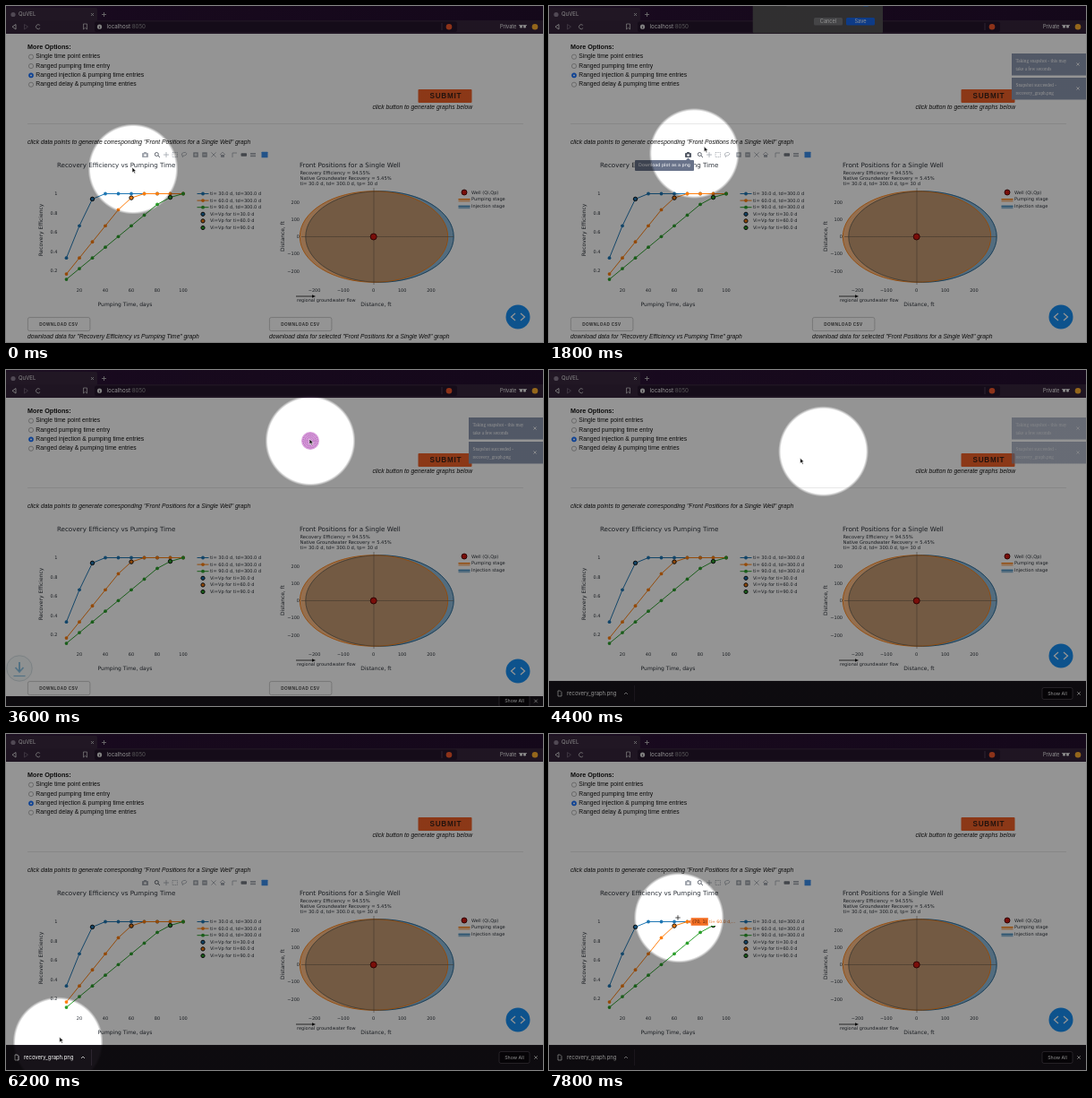
Write an HTML page with a canvas that moves like this. It is 600x375 px and loops after 8 s.

```html
<!DOCTYPE html>
<html lang="en">
<head>
<meta charset="utf-8">
<title>Recovery graphs</title>
<style>
html, body { margin: 0; width: 100%; height: 100%; overflow: hidden; background: #949494; }
canvas { display: block; width: 100vw; height: 100vh; }
</style>
</head>
<body>
<canvas id="stage"></canvas>
<script>
const W = 600, H = 375, LOOP = 8000, STEP = 200;
const SANS = '"Liberation Sans", Arial, sans-serif';
const PLOT = '"DejaVu Sans", Verdana, sans-serif';
const UI = 'Inter, Roboto, sans-serif';
const SERIF = '"Liberation Serif", serif';
const BLUE = '#1f77b4', ORANGE = '#ff7f0e', GREEN = '#2ca02c', INK = '#2a3038';
const SOFT_BLUE = 'rgba(31,119,180,.5)', SOFT_ORANGE = 'rgba(255,127,14,.5)';

const canvas = document.getElementById('stage');
const c = canvas.getContext('2d');

function resize() {
  const r = window.devicePixelRatio || 1;
  canvas.width = Math.round(innerWidth * r);
  canvas.height = Math.round(innerHeight * r);
}
addEventListener('resize', resize);
resize();

// Drawing helpers
function text(s, x, y, size, { font = SANS, color = '#111', align = 'left', style = '', gap = 0 } = {}) {
  c.font = `${style} ${size}px ${font}`;
  c.fillStyle = color;
  c.textAlign = align;
  c.textBaseline = 'middle';
  c.letterSpacing = gap + 'px';
  c.fillText(s, x, y);
}
function box(x, y, w, h, fill, radius = 0, stroke, lw = 0.6) {
  c.beginPath();
  c.roundRect(x, y, w, h, radius);
  paint(fill, stroke, lw);
}
function disc(x, y, r, fill, stroke, lw = 0.7) {
  c.beginPath();
  c.arc(x, y, r, 0, 7);
  paint(fill, stroke, lw);
}
function paint(fill, stroke, lw) {
  if (fill) { c.fillStyle = fill; c.fill(); }
  if (stroke) { c.strokeStyle = stroke; c.lineWidth = lw; c.stroke(); }
}
function line(pts, color, lw = 0.8, fill) {
  c.beginPath();
  for (let i = 0; i < pts.length; i += 2) c.lineTo(pts[i], pts[i + 1]);
  paint(fill, color, lw);
}
function cross(x, y, r, color) {
  line([x - r, y - r, x + r, y + r], color);
  line([x - r, y + r, x + r, y - r], color);
}
function faded(alpha, draw) {
  if (alpha <= 0) return;
  c.save();
  c.globalAlpha *= Math.min(1, alpha);
  draw();
  c.restore();
}
const ramp = (t, a, b) => Math.max(0, Math.min(1, (t - a) / (b - a)));

// Pointer path: time, x, y, joined by a monotone cubic that rests at holds
const path = [
  [0, 142, 182], [300, 142, 182], [1000, 155, 168], [1600, 155, 168],
  [2600, 340, 79], [4100, 340, 79], [4920, 84, 202], [5000, 64, 242],
  [5350, 58, 344], [6100, 58, 344], [7100, 156, 206], [7400, 156, 206],
  [7800, 144, 205], [8000, 144, 205]
];
const slope = (i, k) => path[i] && path[i + 1]
  ? (path[i + 1][k] - path[i][k]) / (path[i + 1][0] - path[i][0]) : 0;
function tangent(i, k) {
  const a = slope(i - 1, k), b = slope(i, k);
  return a * b > 0 ? 2 * a * b / (a + b) : 0;
}
function pointer(t) {
  t = Math.max(0, t);
  const j = Math.max(1, path.findIndex(p => p[0] >= t)), i = j - 1;
  const d = path[j][0] - path[i][0], u = (t - path[i][0]) / d, v = 1 - u;
  return [1, 2].map(k =>
    path[i][k] * (1 + 2 * u) * v * v + path[j][k] * u * u * (3 - 2 * u) +
    d * u * v * (tangent(i, k) * v - tangent(j, k) * u));
}

function browser() {
  const g = c.createLinearGradient(0, 0, W, 0);
  g.addColorStop(0, '#351f3e');
  g.addColorStop(0.2, '#291033');
  g.addColorStop(1, '#230d2d');
  box(0, 0, W, 17, g);
  box(0, 2, 102, 15, '#39273e', 2);
  box(0, 16, W, 15, '#35243b');
  box(99, 17.5, 405, 11.5, '#24142b', 2);
  disc(8, 9.5, 2.6, '#8b7d91');
  text('QuVEL', 14, 9.5, 6, { font: UI, color: '#eee' });
  cross(96.5, 9.5, 1.5, '#ccc');
  line([107, 9.5, 112, 9.5], '#ccc');
  line([109.5, 7, 109.5, 12], '#ccc');
  line([11, 20.5, 7, 23.2, 11, 26, 11, 20.5], '#eee');
  line([20.5, 20.5, 24.5, 23.2, 20.5, 26, 20.5, 20.5], '#75677a');
  c.beginPath();
  c.arc(36, 23.2, 2.5, 0.6, 5.6);
  paint(null, '#ddd', 0.8);
  line([86.5, 20, 90.5, 20, 90.5, 26, 88.5, 24.3, 86.5, 26, 86.5, 20], '#ddd', 0.7);
  disc(104.5, 23.2, 2.6, '#ddd');
  line([104.5, 22.6, 104.5, 24.7], '#24142b');
  text('localhost', 112.5, 23.4, 6.2, { font: UI, color: '#fff' });
  const w = c.measureText('localhost').width;
  text(':8050', 112.5 + w, 23.4, 6.2, { font: UI, color: '#999' });
  line([487, 19, 487, 27], '#77667c', 0.5);
  disc(495, 23.2, 3.3, '#f2572b');
  text('Private', 552, 23.4, 5.6, { font: UI, color: '#fff' });
  box(574, 21.5, 3, 3, '#eee', 1);
  box(578, 21.5, 3, 3, '#eee', 1);
  line([573, 21.5, 582, 21.5], '#eee', 0.8);
  disc(591, 23.2, 3.3, '#ffb02e');
}

function form() {
  text('More Options:', 24, 46, 7.2, { style: 'bold' });
  ['Single time point entries', 'Ranged pumping time entry',
   'Ranged injection & pumping time entries', 'Ranged delay & pumping time entries'
  ].forEach((s, i) => {
    const y = 56.5 + i * 10.35, on = i === 2;
    disc(28, y + 0.2, 2.6, on ? '#1a73ff' : '#fff', on ? '#1a73ff' : '#888', 0.6);
    if (on) disc(28, y + 0.2, 1, '#fff');
    text(s, 33.3, y, 6.74);
  });
  box(460.5, 93, 60, 15, '#f06028', 1);
  text('SUBMIT', 473.5, 100.8, 8.2, { gap: 0.7, style: 'bold', color: '#3c2018' });
  const it = { style: 'italic' };
  text('click button to generate graphs below', 521, 113.5, 6.74, { ...it, align: 'right' });
  line([24, 131.5, 578, 131.5], '#d8d8d8', 0.6);
  text('click data points to generate corresponding "Front Positions for a Single Well" graph', 24, 151.8, 6.72, it);
  [24, 294].forEach(x => {
    box(x + 0.4, 347.6, 69.5, 15, '#fff', 2, '#aaa', 0.6);
    text('DOWNLOAD CSV', x + 13.2, 356, 4.6, { style: 'bold', gap: 0.42, color: '#444' });
  });
  text('download data for "Recovery Efficiency vs Pumping Time" graph', 24, 368.7, 6.72, it);
  text('download data for selected "Front Positions for a Single Well" graph', 294, 368.7, 6.72, it);
}

function label(s, x, y, size, align = 'left', color = INK) {
  text(s, x, y, size, { font: PLOT, color, align });
}
function upright(s, x, y, size) {
  c.save();
  c.translate(x, y);
  c.rotate(-Math.PI / 2);
  label(s, 0, 0, size, 'center');
  c.restore();
}

function efficiencyPlot() {
  const px = d => 53 + 1.45 * d, py = v => 317 - 107.5 * v;
  label('Recovery Efficiency vs Pumping Time', 57, 178, 7.1);
  for (let d = 20; d <= 100; d += 20) label(d, px(d), 317.3, 5, 'center');
  for (const v of [0.2, 0.4, 0.6, 0.8, 1]) label(v, 57.5, py(v) + 0.4, 5, 'right');
  label('Pumping Time, days', 133, 333.3, 6, 'center');
  upright('Recovery Efficiency', 39.8, 250, 6);

  const series = [[30, BLUE, 0.945], [60, ORANGE, 0.957], [90, GREEN, 0.962]];
  series.forEach(([ti, color, knee], i) => {
    const value = d => d === ti ? knee : Math.min(1, d / ti);
    const pts = [];
    for (let d = 10; d <= 100; d += 10) pts.push(px(d), py(value(d)));
    line(pts, color, 1);
    for (let k = 0; k < pts.length; k += 2) disc(pts[k], pts[k + 1], 1.9, color);
    const y = 209.5 + i * 7.6;
    line([213.5, y, 226.5, y], color, 1);
    disc(220, y, 1.9, color);
    label(`ti= ${ti}.0 d, td=300.0 d`, 228, y + 0.2, 5.05);
    disc(220, y + 22.8, 2.1, color, '#111', 1);
    label(`Vi=Vp for ti=${ti}.0 d`, 228, y + 23, 5.05);
  });
  series.forEach(([ti, color, knee]) => disc(px(ti), py(knee), 2.2, color, '#111', 1));
}

function positionPlot() {
  label('Front Positions for a Single Well', 328, 178, 7.2);
  ['Recovery Efficiency = 94.55%', 'Native Groundwater Recovery = 5.45%',
   'ti= 30.0 d, td= 300.0 d, tp= 30 d'].forEach((s, i) => label(s, 328.5, 186.4 + i * 6.3, 5.2));
  const minus = n => String(n).replace('-', '−');
  for (let n = -200; n <= 200; n += 100) {
    label(minus(n), 410.5 + n * 0.322 - (n < 0 ? 1.5 : 0), 317.3, 5, 'center');
    label(minus(n), 328, 257.9 - n * 0.192, 5, 'right');
  }
  label('Distance, ft', 413.5, 333.3, 6, 'center');
  upright('Distance, ft', 309.7, 257, 5.9);

  const front = (x, fill, stroke, lw = 0.9) => {
    c.beginPath();
    c.ellipse(x, 257.5, 82.7, 50.8, 0, 0, 7);
    paint(fill, stroke, lw);
  };
  front(417.5, SOFT_BLUE, BLUE);
  front(411, SOFT_ORANGE, ORANGE);
  front(417.5, null, 'rgba(70,80,85,.6)', 0.5);
  line([330, 257.5, 500, 257.5], '#5c5144', 0.5);
  line([411, 203, 411, 311], '#5c5144', 0.5);
  disc(410.7, 257.5, 3.5, '#d01810', '#400', 0.9);

  line([324, 324, 343, 324], '#111', 0.8);
  line([342, 322.3, 346, 324, 342, 325.7], null, 0, '#111');
  label('regional groundwater flow', 325, 328.3, 5);

  disc(512, 208, 3, '#d01810', '#400', 0.9);
  label('Well (Qi,Qp)', 520, 208.3, 5.05);
  [['Pumping stage', ORANGE, SOFT_ORANGE], ['Injection stage', BLUE, SOFT_BLUE]].forEach(([s, color, soft], i) => {
    const y = 215.5 + i * 7.7;
    box(505.5, y, 13, 3, soft);
    line([505.5, y, 518.5, y], color, 1);
    label(s, 520, y + 0.4, 5.05);
  });
}

function modebar(hot) {
  const y = 166, g = '#a0a5ad', cam = hot ? '#555b66' : g;
  box(152, y - 2, 7, 5, cam, 0.8);
  box(154, y - 3, 3, 2, cam);
  disc(155.5, y + 0.5, 1.3, '#fff');
  disc(168.3, y - 0.5, 2, null, '#60656e', 1);
  line([169.8, y + 1, 172, y + 3], '#60656e', 1);
  line([176, y, 182, y], g);
  line([179, y - 3, 179, y + 3], g);
  c.setLineDash([1, 0.7]);
  box(186, y - 2.5, 5.5, 5, null, 0, g, 0.8);
  c.setLineDash([]);
  c.beginPath();
  c.ellipse(199, y - 0.7, 2.8, 1.8, -0.3, 0, 7);
  paint(null, g, 0.8);
  line([197, y + 0.8, 197.5, y + 3], g);
  [212, 222].forEach((x, i) => {
    box(x - 2.8, y - 2.8, 5.6, 5.6, g, 0.5);
    line([x - 1.7, y, x + 1.7, y], '#fff');
    if (!i) line([x, y - 1.7, x, y + 1.7], '#fff');
  });
  cross(232, y, 2.6, g);
  line([239, y, 242, y - 2.8, 245, y], g);
  box(240, y, 4, 2.8, g);
  line([253, y + 3, 253, y - 2, 258, y - 2], g);
  box(262.5, y - 1.8, 6.5, 3.6, '#737881', 0.8);
  box(273, y - 2, 6, 1.6, g);
  box(273, y + 0.6, 6, 1.6, g);
  box(285.5, y - 3.2, 7, 6.5, '#3b8eea', 0.5);
}

function tooltip() {
  line([152.5, 172.5, 155.5, 169.5, 158.5, 172.5], null, 0, '#69738a');
  box(96, 172, 66, 12, '#69738a', 1);
  label('Download plot as a png', 129, 178, 4.9, 'center', '#fff');
}

function notice(y, a, b) {
  box(517, y, 83, 24.5, '#8c97af');
  text(a, 521.5, y + 8.5, 5.3, { font: SERIF, color: '#fff' });
  text(b, 521.5, y + 17.3, 5.3, { font: SERIF, color: '#fff' });
  cross(591, y + 12, 1.6, '#fff');
}

function hoverLabel() {
  box(177, 205, 31, 9, '#fff');
  line([155, 209.5, 159, 207, 159, 212], null, 0, '#f46f24');
  box(158.5, 205, 19.5, 9, '#f46f24', 0, '#fff', 0.4);
  label('(70, 1)', 168.3, 209.7, 4.9, 'center', '#4a2008');
  label('ti= 60.0 d,...', 178.8, 209.7, 4.7, 'left', '#e66a18');
}

function debugButton(y) {
  disc(572, y, 13.5, '#168ef2');
  line([569, y - 4, 564.5, y, 569, y + 4], '#fff', 1.3);
  line([575, y - 4, 579.5, y, 575, y + 4], '#fff', 1.3);
}

function downloadMark(y) {
  disc(15, y, 15.5, '#f3f7f9', '#fff', 1.2);
  disc(15, y, 14.2, null, '#bdcbd1', 0.7);
  line([15, y - 7, 15, y + 3], '#74b5dc', 2);
  line([10.5, y - 1, 15, y + 4, 19.5, y - 1], '#74b5dc', 1.8);
  line([8.5, y + 8.5, 21.5, y + 8.5], '#74b5dc', 1.2);
}

function shelf(h) {
  if (h <= 0) return;
  const top = H - h, y = top + h / 2;
  c.save();
  c.beginPath();
  c.rect(0, top, W, h);
  c.clip();
  box(0, top, W, h, '#171319');
  line([0, top + 0.2, W, top + 0.2], '#332b37', 0.5);
  if (h > 20) {
    line([10, y - 3, 12.5, y - 3, 14, y - 1.5, 14, y + 3, 10, y + 3, 10, y - 3], '#ddd', 0.8);
    text('recovery_graph.png', 20, y + 0.2, 5.9, { font: UI, color: '#fff' });
    line([84, y + 1, 86, y - 1, 88, y + 1], '#ddd');
    line([95.5, top + 5, 95.5, H - 5], '#423846', 0.5);
  }
  box(551, y - 6.5, 34, 13, '#0a070c', 2, '#6e6573', 0.5);
  text('Show All', 568, y + 0.2, 5.3, { font: UI, color: '#fff', align: 'center' });
  cross(592, y, 1.8, '#ddd');
  c.restore();
}

function saveSheet(open) {
  if (open <= 0) return;
  c.save();
  c.translate(0, -94 * (1 - open));
  box(227.7, -6, 145.3, 98.8, '#525153', 1.5);
  const side = { font: UI, color: '#ddd', align: 'right' }, value = { font: UI, color: '#fff' };
  text('Save As:', 257, 12.2, 5.6, side);
  box(260, 7.3, 105, 9.7, '#2c2d30', 1, '#3f78ae', 1.4);
  box(261.5, 8.7, 43, 7, '#3f70a8');
  text('recovery_graph', 262, 12.2, 5.6, value);
  text('Tags:', 257, 23.7, 5.6, side);
  box(260, 19.5, 105, 8.5, '#434244', 0.5, '#626163', 0.4);
  text('Where:', 257, 37.2, 5.6, side);
  box(260, 32.7, 94, 9, '#6a696b', 1.5);
  box(263.5, 35, 6, 4.5, '#45a5e8', 0.5);
  text('Downloads', 272, 37.2, 5.6, value);
  box(356.5, 32.7, 8, 9, '#6a696b', 1.5);
  line([359, 36.5, 360.5, 38.2, 362, 36.5], '#fff');
  line([228, 46.5, 373, 46.5], '#646365', 0.5);
  text('Format:', 263, 58.7, 5.6, side);
  box(265, 54.2, 92, 9, '#6a696b', 1.5);
  text('PNG image', 267.5, 58.7, 5.6, value);
  [[348, 37.2], [351, 58.7]].forEach(([x, y]) => {
    box(x, y - 4.5, 6, 9, '#176fe6', 1.3);
    line([x + 1.7, y - 1, x + 3, y - 2.7, x + 4.3, y - 1], '#fff', 0.7);
    line([x + 1.7, y + 1, x + 3, y + 2.7, x + 4.3, y + 1], '#fff', 0.7);
  });
  box(296, 75.7, 32, 8.5, '#77777a', 1.5);
  text('Cancel', 312, 80, 5.6, { ...value, align: 'center' });
  box(332, 75.7, 32, 8.5, '#1766e8', 1.5);
  text('Save', 348, 80, 5.6, { ...value, align: 'center' });
  c.restore();
}

function spotlight(x, y) {
  const g = c.createRadialGradient(x, y, 47.5, x, y, 50.5);
  g.addColorStop(0, 'rgba(0,0,0,0)');
  g.addColorStop(1, 'rgba(0,0,0,.42)');
  box(0, 0, W, H, g);
}

function clickMark(x, y, r) {
  disc(x, y, r, 'rgba(190,90,195,.6)');
  c.setLineDash([1, 1]);
  for (let k = 2; k < r; k += 2) disc(x, y, k, null, 'rgba(120,30,130,.65)', 0.8);
  c.setLineDash([]);
}

function cursor(x, y, kind) {
  if (kind === 'cross') {
    for (const [color, lw] of [['#fff', 1.6], ['#222', 0.8]]) {
      line([x - 2.7, y, x + 2.7, y], color, lw);
      line([x, y - 2.7, x, y + 2.7], color, lw);
    }
  } else if (kind === 'hand') {
    box(x - 1, y + 1, 1.7, 5, '#111', 0.8, '#fff', 0.5);
    box(x - 2, y + 3.8, 5, 4, '#111', 1.2, '#fff', 0.5);
  } else {
    line([x - 1, y - 2, x - 1, y + 4, x + 0.5, y + 2.8, x + 1.6, y + 5, x + 2.6, y + 4.5,
          x + 1.6, y + 2.3, x + 3.4, y + 2.2, x - 1, y - 2], '#fff', 0.6, '#111');
  }
}

function scene(t) {
  const [x, y] = pointer(t), [sx, sy] = pointer(t - 80);
  const shelfH = 28 * ramp(t, 3470, 3800);
  const onCamera = t >= 1000 && t < 3500;
  const inPlot = x > 60 && x < 206 && y > 202 && y < 300;

  box(0, 0, W, H, '#fff');
  form();
  efficiencyPlot();
  positionPlot();
  faded(t < 3500 ? 1 : ramp(t, 4930, 5250), () => modebar(onCamera));
  if (onCamera) tooltip();
  if (t >= 7000) hoverLabel();
  const gone = 1 - ramp(t, 4200, 4800);
  faded(ramp(t, 1100, 1400) * gone, () => notice(53, 'Taking snapshot - this may', 'take a few seconds'));
  faded(ramp(t, 1270, 1600) * gone, () => notice(80, 'Snapshot succeeded -', 'recovery_graph.png'));
  debugButton(347 - shelfH);
  if (t > 3500) faded(0.8 - Math.abs(t - 3600) / 500, () => downloadMark(333 + (t - 3600) / 20));
  shelf(shelfH);
  browser();
  saveSheet(ramp(t, 1700, 2000) * (1 - ramp(t, 3450, 3600)));

  spotlight(sx, sy);
  for (const press of [1100, 3350]) {
    const age = t - press;
    if (age > 0 && age <= 300) clickMark(x, y, 5 + age / 50);
  }
  cursor(x, y, inPlot ? 'cross' : t >= 1000 && t <= 1600 ? 'hand' : 'arrow');
}

function frame(now) {
  const t = Math.floor(now % LOOP / STEP) * STEP;
  c.setTransform(canvas.width / W, 0, 0, canvas.height / H, 0, 0);
  scene(t);
  requestAnimationFrame(frame);
}
requestAnimationFrame(frame);
</script>
</body>
</html>
```
